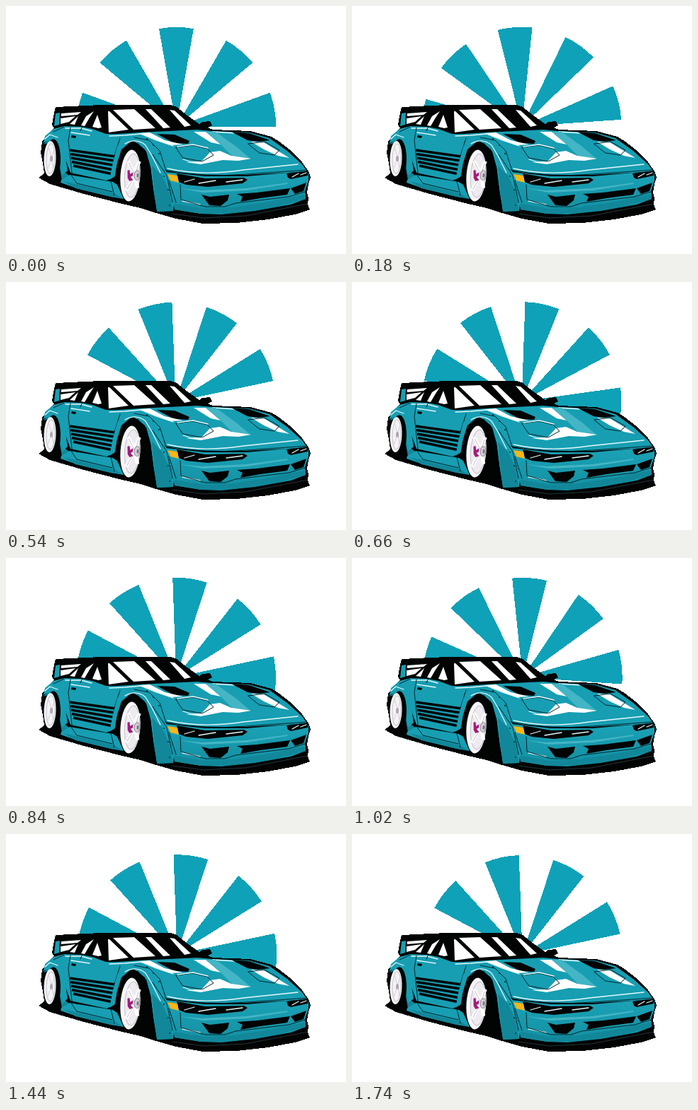
These frames come from a looping animation (480 px wide and 351 px high, 1.8 s). An HTML page:

```html
<!DOCTYPE html>
<html lang="en">
<head>
<meta charset="utf-8">
<title>Car with turning rays</title>
<style>
  html, body { margin: 0; width: 100%; height: 100%; overflow: hidden; background: #fff; }
  svg { display: block; width: 480px; height: 351px; }
  .ink { fill: #020303; }
  .teal { fill: #179eb2; }
  .deep { fill: #118799; }
  .light { fill: #43b5c4; }
  .white { fill: #fff; }
  .line { fill: none; stroke: #06242b; stroke-width: 1; stroke-linejoin: round; stroke-linecap: round; }
  .shine { fill: none; stroke: #e4f7f9; stroke-width: 1.3; stroke-linejoin: round; stroke-linecap: round; }
  .stripes { fill: none; stroke: #020303; stroke-width: 3.4; }
</style>
</head>
<body>
<svg viewBox="0 0 480 351">
  <defs>
    <clipPath id="sky"><path d="M0 0H480V204H0Z"/></clipPath>
    <linearGradient id="bumper" x1="0" y1="0" x2="0" y2="1">
      <stop offset="0" stop-color="#1ba2b6"/><stop offset="1" stop-color="#138fa2"/>
    </linearGradient>
  </defs>

  <g clip-path="url(#sky)"><path id="rays" fill="#0fa1b7" shape-rendering="crispEdges"/></g>

  <!-- silhouette and ground shadow -->
  <path class="ink" shape-rendering="crispEdges" d="M68 151 70 143 112 141Q150 139 232 140L241 143 256 155 273 167 277 164 288 163 291 169 285 172 292 175 345 177 375 185 386 192 400 203 418 221 427 234 430 242 427 252 425 264 427 272 426 281 429 288 408 295 370 302 325 307 278 308 240 301 212 293 190 286 160 279 110 266 62 252 46 243 54 237 52 222 49 208 51 192 60 180 68 173 65 168Z"/>

  <!-- wing and cabin -->
  <path class="teal" d="M70 152 76 151 75 168 68 170Z"/>
  <path class="white" d="M78 152 106 150 101 154 78 156ZM77 159 98 156 89 164 77 167Z"/>
  <path class="white" d="M90 167 102 156 97 168ZM106 169 113 156 124 149 118 158 111 170ZM122 171 129 154 135 172 130 173Z"/>
  <path class="white" d="M144 149 146 149 173 175 145 179ZM151 147 181 146 211 173 180 175ZM197 146 205 146 232 172 222 173ZM231 147 238 148 261 169 252 171Z"/>
  <path class="ink" d="M119 174 126 172 139 177 140 182 125 180Z"/>

  <!-- rear quarter and door -->
  <path class="teal" d="M67 174 82 170 107 171 122 174 141 181 172 182 196 184 176 192 163 203 157 222 153 242 142 247 91 236 83 214 75 194 63 187 53 194 55 184Z"/>
  <path class="deep" d="M52 196 63 188 74 197 81 214 84 236 92 242 79 247 74 218 68 201 60 194Z"/>
  <path class="teal" d="M52 194 62 184 75 190 83 207 87 233 79 240 75 215 68 198 60 191Z"/>
  <path class="shine" d="M55 188 62 182 73 186M84 173 106 173 121 177M92 179 118 183"/>
  <path class="line" d="M91 172 88 190 93 236M108 170 105 177M161 187 153 212 151 242M82 171 67 178"/>
  <path class="stripes" d="M90 204 154 213M91 209.500 153 219M92 215 153 225.500M93 220.500 152 232M95 226 151 238"/>
  <path class="ink" d="M93 183 99 184 98 187 92 186Z"/>
  <path class="teal" d="M78 246 90 239 151 249 157 253 166 273 148 270 100 258 77 250Z"/>
  <path class="deep" d="M81 248 99 252 152 265 165 272 148 270 98 258Z"/>
  <path class="line" d="M91 238 100 251 150 263M148 248 153 268"/>

  <!-- hood and front fender -->
  <path class="teal" d="M143 182 188 179 270 175 291 177 343 179 372 187 397 205 418 224 425 234 395 236 338 239 281 239 243 236 226 233 237 280 236 290 213 291 208 260 204 228 196 203 179 190 166 195 158 207 154 240 146 246 151 221 157 199 170 186Z"/>
  <path class="deep" d="M206 226 220 240 230 261 236 290 213 291 209 258Z"/>
  <path class="shine" d="M146 184 168 183 190 181 212 190 236 198M168 195Q184 186 197 197L206 212 218 236M292 178 340 181"/>
  <path class="line" d="M181 186 202 190 217 205 226 233M207 210 227 240 235 278"/>
  <path class="ink" d="M213 181 238 182 259 191 257 195 237 194ZM318 178 343 180 373 190 355 192 341 190Z"/>
  <path class="white" d="M188 180 203 179 224 190 250 196 232 197 211 189ZM265 178 282 178 303 196 289 193ZM346 192 364 193 387 207 400 215 384 212 364 203Z"/>
  <path class="light" d="M282 178 296 178 325 199 345 216 322 215 303 196Z"/>
  <path class="white" d="M288 207 302 205 318 212 346 216 328 219 306 218 275 224 254 221 276 220Z"/>
  <path class="line" d="M240 200 264 197 284 202 293 211 277 220 250 215ZM342 195 365 192 386 204 379 211 358 208Z"/>
  <path class="shine" d="M242 199 264 196 285 201M250 217 262 221 278 221M228 230Q277 241 335 232L412 224"/>
  <path class="line" d="M224 232Q277 243 340 238L425 232"/>

  <!-- nose and bumper -->
  <path fill="url(#bumper)" d="M226 235 281 241 340 241 397 236 427 235 427 247 422 262 423 273 402 281 351 290 304 295 275 294 238 288 233 263Z"/>
  <path class="light" d="M246 258 275 261 339 258 398 250 397 252 340 261 278 264Z"/>
  <path class="ink" d="M241 237 281 244 336 243 341 246 334 251 285 256 254 253 244 249ZM396 237 427 233 426 240 402 245 398 243Z"/>
  <path class="shine" d="M252 249 266 245M272 251 296 247M311 249 334 246M404 242 413 237M416 239 424 236"/>
  <path fill="#fdb515" d="M228 238 242 240 244 250 232 247Z"/>
  <path class="ink" d="M276 267 288 270 315 267 313 275 303 283 287 282ZM326 266 354 264 401 258 397 267 359 272 331 277 334 270ZM402 258 424 250 420 262 408 266Z"/>
  <path class="deep" d="M238 280 279 287 322 285 377 276 423 266 423 273 382 284 321 293 276 294 238 288Z"/>
  <path class="shine" d="M249 276 274 281"/>
  <path class="line" d="M246 253 247 274 281 284 309 284 324 279 399 270 422 263M230 247 240 278"/>
  <path fill="none" stroke="#26343b" d="M235 294 279 300 338 297 426 280"/>
  <g fill="#09272e">
    <circle cx="199" cy="188" r="1"/><circle cx="208" cy="197" r="1"/><circle cx="216" cy="209" r="1"/>
    <circle cx="223" cy="241" r="1"/><circle cx="229" cy="260" r="1"/><circle cx="231" cy="282" r="1"/>
  </g>

  <!-- wheels -->
  <g transform="rotate(2 62 217)">
    <ellipse class="ink" cx="66" cy="219" rx="11" ry="31"/>
    <ellipse cx="62" cy="216" rx="8.500" ry="25" fill="#f4f3f5"/>
    <ellipse cx="63" cy="216" rx="6" ry="21" fill="none" stroke="#c8c5cb"/>
    <path d="M60 201 64 214 68 203M64 216 59 231M65 217 67 228" fill="none" stroke="#d4d1d7"/>
    <ellipse cx="64" cy="216" rx="2" ry="4" fill="#aaa8af"/>
  </g>
  <path class="ink" d="M158 222 163 206 174 195 186 194 198 206 204 228 208 260 213 292 190 286 168 275Z"/>
  <g transform="rotate(4 176 240)">
    <ellipse cx="175.500" cy="240" rx="14" ry="36.500" fill="#f7f6f8"/>
    <ellipse cx="178" cy="240" rx="10.500" ry="31" fill="#edeaf0" stroke="#c4c0c8"/>
    <path d="M171 220 181 236 187 219M180 243 171 262M183 243 187 257" fill="none" stroke="#fff" stroke-width="5"/>
    <path d="M172 222 181 237M179 246 172 260M186 222 183 235" fill="none" stroke="#c6c2ca"/>
    <path fill="#a11d7e" d="M171 233 174 232 175 238 179 235 179 240 176 242 180 246 175 248 172 244Z"/>
    <ellipse cx="185" cy="239" rx="4" ry="7" fill="#d1ced5" stroke="#8e8b94"/>
    <ellipse cx="186" cy="239" rx="1.500" ry="3" fill="#77747c"/>
  </g>
</svg>
<script>
  const rays = document.getElementById("rays");
  const LOOP = 1800, STEP = 60, COUNT = 9, RADIUS = 140.8;
  const radians = degrees => degrees * Math.PI / 180;

  function wedge(cx, cy, angle) {
    const rim = a => `${cx + RADIUS * Math.sin(radians(a))} ${cy - RADIUS * Math.cos(radians(a))}`;
    return `M${cx} ${cy}L${rim(angle - 10)}A${RADIUS} ${RADIUS} 0 0 1 ${rim(angle + 10)}Z`;
  }

  // The fan's centre sits slightly off its pivot, so it wobbles as it turns.
  function draw(time) {
    const turn = Math.floor((time % LOOP) / STEP) * 360 * STEP / LOOP;
    const cx = 240.4 - 1.1 * Math.sin(radians(turn));
    const cy = 169.7 + 1.1 * Math.cos(radians(turn));
    let path = "";
    for (let i = 0; i < COUNT; i++) path += wedge(cx, cy, turn + i * 360 / COUNT);
    rays.setAttribute("d", path);
  }

  const start = performance.now();
  function tick() {
    draw(performance.now() - start);
    requestAnimationFrame(tick);
  }
  tick();
</script>
</body>
</html>
```
